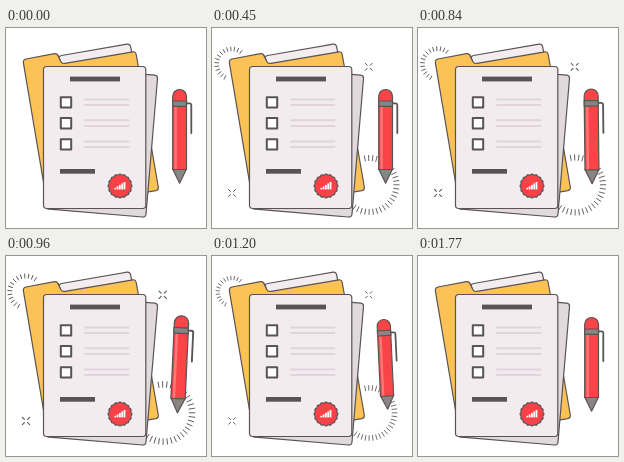
Write an HTML page that moves like this. It is 200 px wide and 200 px high and loops after 1.83 s.

```html
<!DOCTYPE html>
<html lang="en">
<head>
<meta charset="utf-8">
<title>Checklist</title>
<style>
  html, body { margin: 0; width: 100%; height: 100%; overflow: hidden; background: #fff; }
  svg { display: block; width: 100vw; height: 100vh; }
</style>
</head>
<body>
<svg viewBox="0 0 200 200" fill="none" stroke="#595353" stroke-width="1.2" stroke-linejoin="round" stroke-linecap="round">
  <g id="rings" stroke-width=".9" stroke-linecap="butt"></g>
  <g id="sparks" stroke-width="1"></g>

  <g id="folder">
    <path fill="#fdc256" d="M20 31 L48.5 25.6 Q51 25.2 52 27.4 L55 34 L130 30 L152.3 159 Q152.8 162 149.8 162.6 L42 181 L17.4 34.8 Q17 31.6 20 31Z"/>
    <path fill="#f4edf0" d="M53.2 29.6 Q53.6 27.8 55.5 27.5 L121 16.2 Q123.8 15.8 124.6 18.6 L129 42 H57Z"/>
    <path fill="#fdc256" stroke="none" d="M52 28 L54.6 33.2 Q56 36 59 35.4 L127 23.8 Q129.6 23.4 130.1 26 L133 42 H45Z"/>
    <path d="M52 27.4 L54.6 33.2 Q56 36 59 35.4 L127 23.8 Q129.6 23.4 130.1 26 L133 42"/>
  </g>

  <path fill="#e1d9dc" d="M48 39 L148.8 47.2 Q151.8 47.5 151.5 50.5 L140 186 Q139.7 189.3 136.5 189 L43.5 181.2 Q40.5 181 40.7 178Z"/>
  <rect x="37.5" y="38.5" width="102.3" height="142" rx="3.2" fill="#f3ecee"/>
  <g stroke="none" fill="#595353">
    <rect x="64" y="48.6" width="50" height="4.8"/>
    <rect x="54" y="141" width="35" height="4.7"/>
  </g>
  <g id="items"></g>
  <path id="seal" fill="#fa4148"/>
  <g id="bars" stroke="none" fill="#fff"></g>

  <g id="pen">
    <path d="M180.5 75.4 H183.8 Q185.3 75.4 185.3 77 V105" stroke-width="1.8"/>
    <path fill="#8b8485" d="M166.7 141 H180.5 L173.6 155.2Z"/>
    <path fill="#fb4447" d="M166.7 141.5 V68.4 A6.9 6.9 0 0 1 180.5 68.4 V141.5Z"/>
    <path d="M169.6 79 V141" stroke="#fd7778" stroke-width="2.4" stroke-linecap="butt"/>
    <rect x="166.7" y="73" width="13.8" height="5.4" fill="#8b8485"/>
  </g>
</svg>
<script>
const LOOP = 1830;
const $ = id => document.getElementById(id);
const clamp = v => Math.max(0, Math.min(1, v));
const ease = v => v * v * (3 - 2 * v);
const progress = (t, from, to) => ease(clamp((t - from) / (to - from)));

function add(parent, tag, attrs) {
  const el = document.createElementNS('http://www.w3.org/2000/svg', tag);
  for (const key in attrs) el.setAttribute(key, attrs[key]);
  parent.appendChild(el);
  return el;
}

// Angles run clockwise from twelve o'clock.
function polar(cx, cy, r, degrees) {
  const a = degrees * Math.PI / 180;
  return [cx + r * Math.sin(a), cy - r * Math.cos(a)];
}

function makeRing({ cx, cy, inner, outer, start, sweep, count }) {
  const group = add($('rings'), 'g', {});
  const ticks = Array.from({ length: count }, (_, i) => {
    const at = i / (count - 1);
    const [x1, y1] = polar(cx, cy, inner, start + sweep * at);
    const [x2, y2] = polar(cx, cy, outer, start + sweep * at);
    return { at, el: add(group, 'line', { x1, y1, x2, y2 }) };
  });
  return { cx, cy, group, ticks };
}

const rings = [
  makeRing({ cx: 19.8, cy: 36, inner: 12.8, outer: 17.4, start: 207, sweep: 190, count: 15 }),
  makeRing({ cx: 157.5, cy: 157, inner: 24, outer: 30, start: -10, sweep: 224, count: 28 })
];

const sparks = [[156.7, 38.8], [20, 165]].map(([x, y]) => ({
  x, y,
  el: add($('sparks'), 'path', {})
}));

for (const y of [74.4, 95.2, 116.4]) {
  add($('items'), 'rect', { x: 54.8, y: y - 5.2, width: 10.4, height: 10.4, fill: '#fff', 'stroke-width': 2 });
  for (const dy of [-2.9, 2.7])
    add($('items'), 'path', { d: `M79 ${y + dy}H122.5`, stroke: '#e2d4dc', 'stroke-width': 2 });
}

const sealPoints = Array.from({ length: 96 }, (_, i) =>
  polar(114, 158, 11.5 + 0.45 * Math.cos(i * Math.PI / 3), i * 3.75));
$('seal').setAttribute('d', 'M' + sealPoints.map(p => p.map(v => v.toFixed(2))).join('L') + 'Z');

for (let i = 0; i < 5; i++) {
  const height = 1.6 + i * 1.45;
  add($('bars'), 'rect', { x: 108.4 + i * 2.3, y: 161.4 - height, width: 1.8, height });
}

// Each key is [time, value]; values between keys are eased.
const tilt = [[450, 0], [690, -5.2], [960, 2.6], [1200, -2.7], [1410, 0]];
const pulse = [[450, 0], [690, -0.04], [960, 0.06], [1200, -0.07], [1410, 0]];

function valueAt(keys, t) {
  let value = keys[0][1];
  for (let i = 1; i < keys.length; i++) {
    const [t0, v0] = keys[i - 1], [t1, v1] = keys[i];
    if (t >= t0) value = v0 + (v1 - v0) * progress(t, t0, t1);
  }
  return value;
}

const scaleAround = (x, y, scale) => `translate(${x} ${y}) scale(${scale}) translate(${-x} ${-y})`;

function sparkPath(x, y, from, to) {
  if (to - from < 0.02) return '';
  const near = 1.5 + 2 * from, far = 1.5 + 2 * to;
  return [[-1, -1], [1, -1], [1, 1], [-1, 1]].map(([sx, sy]) =>
    `M${x + sx * near} ${y + sy * near}L${x + sx * far} ${y + sy * far}`).join('');
}

function draw(t) {
  const beat = valueAt(pulse, t);
  const shown = progress(t, 0, 430), hidden = progress(t, 1230, 1610);
  for (const { cx, cy, group, ticks } of rings) {
    group.setAttribute('transform', scaleAround(cx, cy, 1 + beat));
    for (const { at, el } of ticks) {
      const visible = shown > 0 && at <= shown && (hidden === 0 || at > hidden);
      el.setAttribute('visibility', visible ? 'visible' : 'hidden');
    }
  }
  const grow = progress(t, 60, 400), fade = progress(t, 1430, 1750);
  for (const { x, y, el } of sparks) {
    el.setAttribute('d', sparkPath(x, y, fade, grow));
    el.setAttribute('transform', scaleAround(x, y, 1 + beat));
  }
  $('pen').setAttribute('transform',
    `rotate(${valueAt(tilt, t)} 173.4 108.3) ${scaleAround(173.4, 108.3, 1 + beat * 0.6)}`);
}

const begin = performance.now();
function tick() {
  const t = (performance.now() - begin) % LOOP;
  draw(Math.min(1770, Math.floor(t / 30) * 30));
  requestAnimationFrame(tick);
}
draw(0);
requestAnimationFrame(tick);
</script>
</body>
</html>
```
